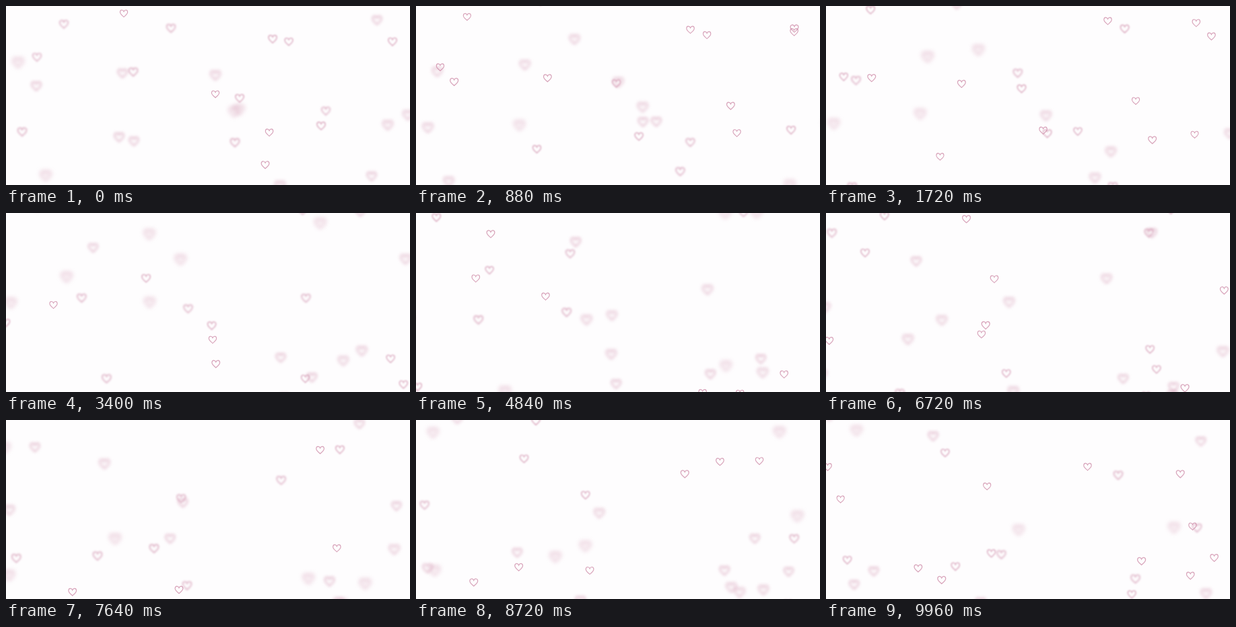
An HTML page with a canvas for the animation above (10 s loop, 600x266 px).

```html
<!DOCTYPE html>
<html lang="en">
<head>
<meta charset="utf-8">
<title>Drifting hearts</title>
<style>
  html, body { margin: 0; height: 100%; overflow: hidden; background: #fefdfe; }
  canvas { display: block; }
</style>
</head>
<body>
<canvas width="600" height="266"></canvas>
<script>
const WIDTH = 600, HEIGHT = 266, MARGIN = 13, LOOP = 10;
const ctx = document.querySelector('canvas').getContext('2d');
const outline = new Path2D(
  'M0 5.2C-2 3.2-5.5 1.2-5.5-1.9C-5.5-5.6-1.3-6 0-2.7C1.3-6 5.5-5.6 5.5-1.9C5.5 1.2 2 3.2 0 5.2Z');

// Each flock spreads evenly over a range of headings (degrees) and speeds (px/s);
// its starting points run from the fastest heart to the slowest.
const flocks = [
  { heading: [40, 55], speed: [26.5, 12.5],
    starts: '339,157 391,188 597,162 18,84 543,253 551,21 407,267 468,178 385,236 189,98' },
  { heading: [116, 144], speed: [23, 14],
    starts: '346,154 245,33 46,76 347,137 190,201 311,103 59,252 567,177' },
  { heading: [231, 224], speed: [26, 10],
    starts: '168,195 311,131 574,53 173,100 86,27 340,203 475,156 24,187' },
  { heading: [299, 332], speed: [23, 15],
    starts: '175,11 396,49 420,53 45,119' }
];

let seed = 11;
function random() {
  seed = (seed * 16807) % 2147483647;
  return seed / 2147483647;
}

const mix = ([from, to], k) => from + (to - from) * k;

const hearts = flocks.flatMap(({ heading, speed, starts }) =>
  starts.split(' ').map((start, i, all) => {
    const [x, y] = start.split(',').map(Number);
    const k = i / (all.length - 1);
    const angle = mix(heading, k) * Math.PI / 180;
    const pace = mix(speed, k);
    return {
      x, y,
      vx: pace * Math.cos(angle),
      vy: pace * Math.sin(angle),
      period: mix([4, 8], random()),
      phase: random()
    };
  }));

// Reflects a coordinate between two walls just outside the stage
function bounce(v, size) {
  const span = size + 2 * MARGIN;
  const u = (v + MARGIN + 2 * span) % (2 * span);
  return (u < span ? u : 2 * span - u) - MARGIN;
}

// Goes linearly from sharp (0) to soft (1) and back
const softness = ({ period, phase }, t) => 1 - Math.abs(1 - 2 * ((t / period + phase) % 1));

function drawHeart(heart, t) {
  const soft = softness(heart, t);
  const scale = mix([1, 1.35], soft);
  const blur = 3.4 * soft;
  ctx.filter = blur > 0.15 ? `blur(${blur.toFixed(2)}px)` : 'none';
  ctx.globalAlpha = mix([0.75, 0.55], soft);
  ctx.lineWidth = mix([1.05, 1.6], soft);
  ctx.setTransform(scale, 0, 0, scale,
    bounce(heart.x + heart.vx * t, WIDTH), bounce(heart.y + heart.vy * t, HEIGHT));
  ctx.stroke(outline);
}

function draw(now) {
  const t = (now / 1000) % LOOP;
  ctx.reset();
  ctx.fillStyle = '#fefdfe';
  ctx.fillRect(0, 0, WIDTH, HEIGHT);
  ctx.strokeStyle = '#c9809f';
  hearts.forEach(heart => drawHeart(heart, t));
  requestAnimationFrame(draw);
}
requestAnimationFrame(draw);
</script>
</body>
</html>
```
